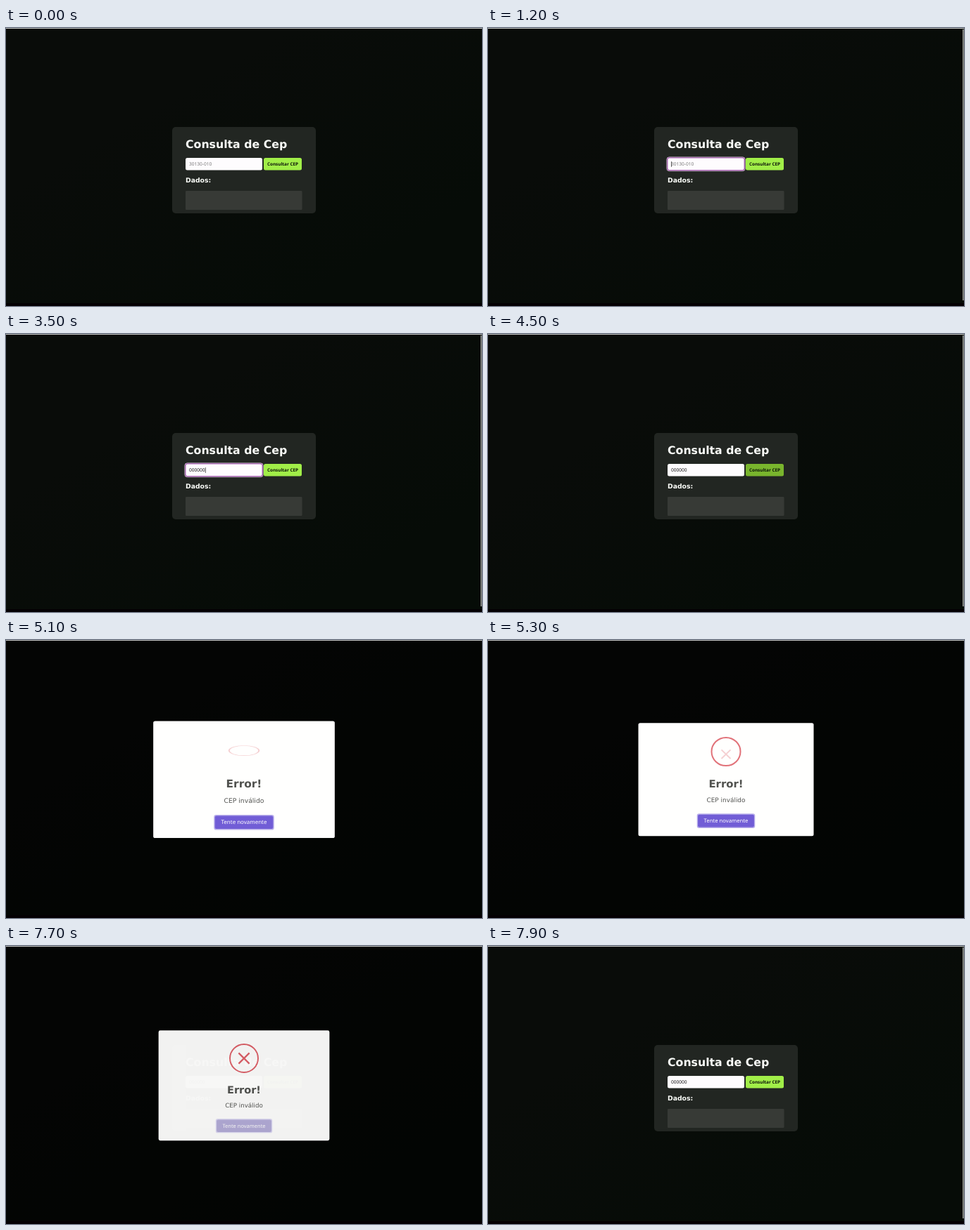
Recreate the animation shown at these times as an HTML page. Size 676 by 396 pixels, loop 8000 ms.

```html
<!DOCTYPE html>
<html lang="pt-BR">
<head>
<meta charset="utf-8">
<title>Consulta de Cep</title>
<style>
  html, body { margin: 0; width: 100%; height: 100%; overflow: hidden; background: #080b08; }
  svg { display: block; width: 676px; height: 396px; }
  text { font-family: "DejaVu Sans", sans-serif; text-rendering: geometricPrecision; white-space: pre; }
  .bold { font-weight: 700; }
  .ui { font-family: "Noto Sans", "Open Sans", sans-serif; }
  .mid { text-anchor: middle; }
</style>
</head>
<body>
<svg viewBox="0 0 676 396">
  <defs>
    <linearGradient id="page" x1="0" y1="0" x2="1" y2="1">
      <stop offset=".3" stop-color="#090c09"/>
      <stop offset=".8" stop-color="#060c07"/>
    </linearGradient>
  </defs>
  <rect width="676" height="396" fill="url(#page)"/>

  <rect x="236" y="141" width="204" height="123" rx="5" fill="#222622"/>
  <text class="bold" x="255" y="170.6" font-size="15.75" fill="#fbfdf9">Consulta de Cep</text>
  <rect x="255" y="185" width="109" height="17.6" rx="2.5" fill="#fefcfe"/>
  <g id="ring" fill="none">
    <rect x="253.9" y="183.9" width="111.2" height="19.8" rx="3.4" stroke="#ecd3ee" stroke-width=".8"/>
    <rect x="254.9" y="184.9" width="109.2" height="17.8" rx="2.6" stroke="#b56cbf" stroke-width="1.2"/>
  </g>
  <text id="field" class="ui" x="260" y="196.4" font-size="6.6"></text>
  <rect id="caret" y="190.2" width=".7" height="7.6" fill="#111"/>
  <rect id="send" x="366" y="185" width="54" height="17.6" rx="2.5"/>
  <text class="ui bold mid" x="393" y="196.3" font-size="6.35" fill="#0c140a">Consultar CEP</text>
  <text class="bold" x="255" y="220.1" font-size="9.27" fill="#fbfdf9">Dados:</text>
  <rect x="255" y="232" width="165.5" height="27" rx="1" fill="#373a36"/>

  <rect id="shade" width="676" height="396" fill="#000" opacity=".6"/>
  <g id="modal">
    <rect x="213.5" y="118.2" width="249" height="161" rx="2.5" fill="#fffffe"/>
    <g fill="none" stroke="#de6068">
      <circle id="icon" cx="0" cy="0" r="20.5" stroke-width="2"/>
      <path id="cross" d="M-7.8-7.8 7.8 7.8M7.8-7.8-7.8 7.8" stroke-width="2.3"/>
    </g>
    <text class="bold mid" x="338" y="210" font-size="14.85" fill="#51524f">Error!</text>
    <text class="mid" x="338" y="230.8" font-size="8.91" fill="#545552">CEP inválido</text>
    <g id="retry">
      <rect x="296.7" y="247.3" width="82.6" height="20.8" rx="3" fill="#b8aeea"/>
      <rect id="face" x="298.1" y="248.8" width="79.8" height="17.8" rx="2"/>
      <text class="ui mid" x="338" y="260.3" font-size="7.7" font-weight="500" fill="#fff">Tente novamente</text>
    </g>
  </g>

  <rect id="bar" x="674" y="2" width="1.6" height="386" fill="#9b9d9b"/>
  <rect width="676" height="1" fill="#c2c4c2"/>
  <rect y="392" width="676" height="4" fill="#040003"/>
</svg>
<script>
const LOOP = 8000, STEP = 100;
const KEYS = [1900, 2100, 2600, 2800, 3400, 3500];
const OPEN = 5000, CLOSE = 7690;
const DIGIT = 6.6 * 0.572;

const $ = id => document.getElementById(id);
const set = (id, attrs) => {
  for (const k in attrs) $(id).setAttribute(k, attrs[k]);
};
const show = (id, on) => set(id, { visibility: on ? 'visible' : 'hidden' });
const clamp = v => Math.min(1, Math.max(0, v));

// cubic-bezier(.25, .1, .25, 1)
function ease(x) {
  if (x <= 0 || x >= 1) return clamp(x);
  const curve = (a, b, s) => 3 * a * s * (1 - s) ** 2 + 3 * b * s * s * (1 - s) + s ** 3;
  let lo = 0, hi = 1;
  for (let i = 0; i < 24; i++) {
    const m = (lo + hi) / 2;
    if (curve(.25, .25, m) < x) lo = m; else hi = m;
  }
  return curve(.1, 1, lo);
}

// stops: [[offset, value], ...], eased between neighbours
function track(p, stops) {
  for (let i = 1; i < stops.length; i++) {
    const [a, from] = stops[i - 1], [b, to] = stops[i];
    if (p < b) return from + (to - from) * ease((p - a) / (b - a));
  }
  return stops[stops.length - 1][1];
}

function drawForm(t) {
  const typed = KEYS.filter(k => t >= k).length;
  const focused = t >= 1100 && t < 4500;
  $('field').textContent = typed ? '0'.repeat(typed) : '30130-010';
  set('field', { fill: typed ? '#161616' : '#777' });
  show('ring', focused);
  set('ring', { opacity: t < 1200 ? .5 : 1 });
  show('caret', focused);
  set('caret', { x: 260.2 + typed * DIGIT });
  set('send', { fill: t >= 4200 && t < 5100 ? '#79b52d' : '#a1ee48' });
  show('bar', t >= 300 && t < 5100 || t >= 7900);
}

function drawModal(t) {
  const open = t >= 5100 && t < 7900;
  show('modal', open);
  show('shade', open && t < 7800);
  if (!open) return;

  const age = t - OPEN;
  const p = age / 500;
  const out = ease((t - CLOSE) / 150);
  const size = track(age / 300, [[0, .7], [.45, 1.05], [.8, .95], [1, 1]]) * (1 - out / 2);
  set('modal', {
    transform: `translate(338 198.7) scale(${size}) translate(-338 -198.7)`,
    opacity: 1 - out
  });

  const turn = Math.cos(100 * (1 - ease(p)) * Math.PI / 180);
  set('icon', { transform: `translate(338 159) scale(1 ${turn})`, opacity: ease(p) });

  const drop = track(p, [[.5, 12.9], [.8, -3], [1, 0]]);
  const grow = track(p, [[.5, .4], [.8, 1.15], [1, 1]]);
  set('cross', {
    transform: `translate(338 ${159 + drop * turn}) scale(${grow} ${grow * turn})`,
    opacity: p <= .5 ? 0 : ease((p - .5) * 2)
  });

  set('face', { fill: t < 7100 ? '#715dd6' : t < 7600 ? '#6654c1' : '#5a4aab' });
  set('retry', { opacity: t >= 7700 ? .45 : 1 });
}

function frame(now) {
  const t = Math.floor(now % LOOP / STEP) * STEP;
  drawForm(t);
  drawModal(t);
  requestAnimationFrame(frame);
}
frame(0);
</script>
</body>
</html>
```
